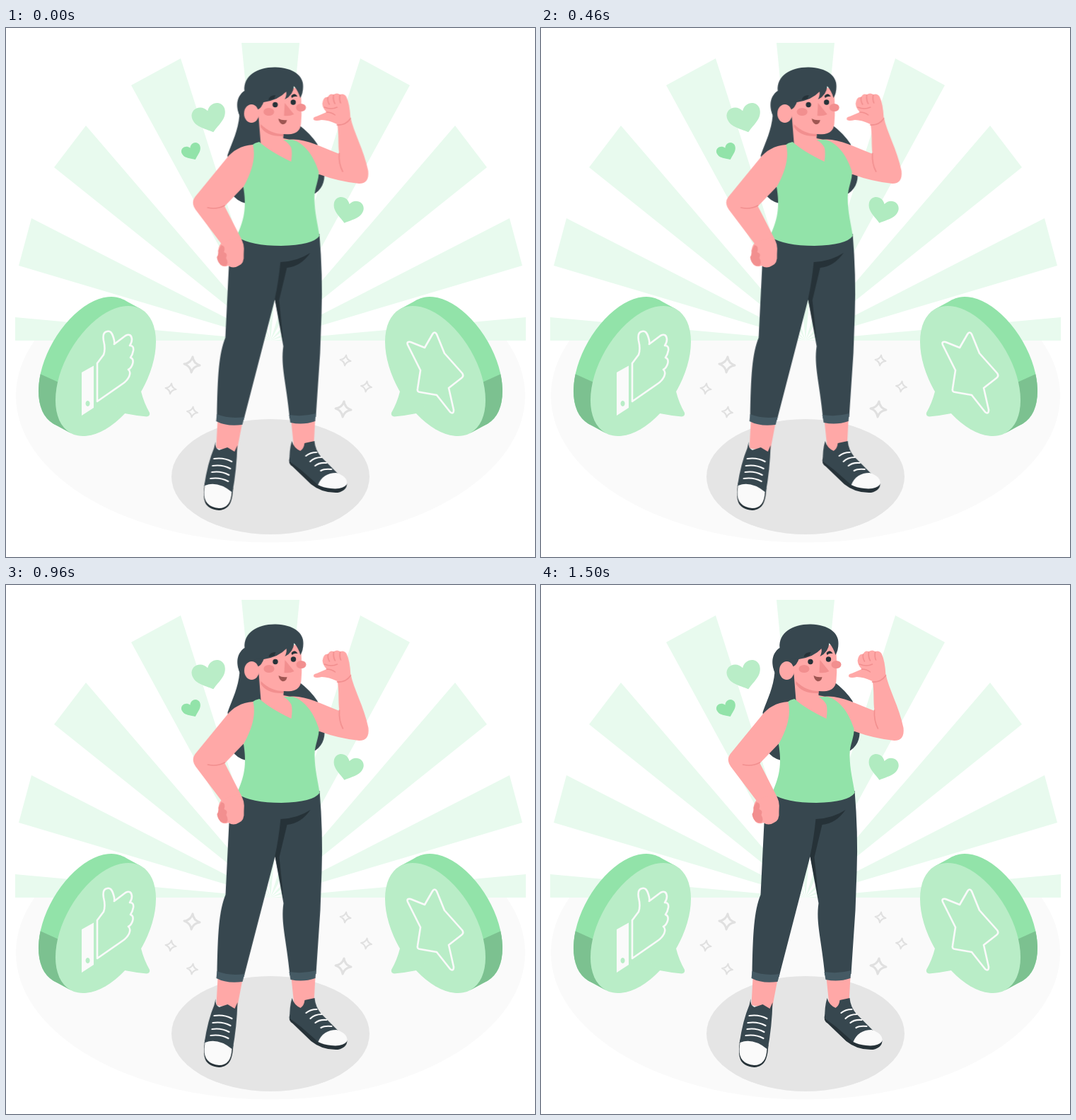
These frames come from a looping animation (748 px wide and 748 px high, 1540 ms). An HTML page without scripts:

```html
<!DOCTYPE html>
<html lang="en">
<head>
<meta charset="utf-8">
<title>Confident woman</title>
<style>
  html, body { margin: 0; width: 100%; height: 100%; overflow: hidden; background: #fff; }
  svg { display: block; width: 100vw; height: 100vh; }
  .woman { animation: shake 1540ms linear -42ms infinite; }
  @keyframes shake {
    0%, 100% { transform: translateX(0); }
    10%, 90% { transform: translateX(-1.5px); }
    20%, 80% { transform: translateX(3px); }
    30%, 50%, 70% { transform: translateX(-6px); }
    40%, 60% { transform: translateX(6px); }
  }
  .rays { fill: #e8faee; }
  .mint { fill: #92e3a9; }
  .pale { fill: #b9edc7; }
  .moss { fill: #7cc190; }
  .dark { fill: #37474f; }
  .deep { fill: #263238; }
  .hem { fill: #455a64; }
  .skin { fill: #ffa8a7; }
  .blush { fill: #f28f8f; }
  .white { fill: #fafafa; }
  .line { fill: none; stroke-linecap: round; stroke-linejoin: round; }
  .icon { stroke: #fafafa; stroke-width: 2.6; }
  .crease { stroke: #f28f8f; stroke-width: 1.6; }
  .lace { stroke: #fafafa; stroke-width: 2.2; }
  .sparkles { stroke: #e0e0e0; }
</style>
</head>
<body>
<svg viewBox="0 0 748 748">
  <defs>
    <path id="rays" d="M374 442 177 81 247 43ZM374 442 68 197 113 138ZM374 442 18 336 36 269ZM374 442H13V409Z"/>
    <path id="heart" d="M0 20C-11 11-24 6-24-8C-23-21-6-23 0-11C6-23 23-21 24-8C24 6 11 11 0 20Z"/>
    <path id="sparkle" d="M0-11Q2-2 11 0Q2 2 0 11Q-2 2-11 0Q-2-2 0-11Z"/>
    <clipPath id="floor"><path d="M0 442H748V748H0Z"/></clipPath>
    <clipPath id="underside"><path d="M30 481 90 508V600H30Z"/></clipPath>
    <ellipse id="disc" rx="100.8" ry="57.9" transform="rotate(-60.1)"/>
    <g id="rim">
      <use href="#disc" transform="translate(117 472)"/>
      <path d="M166.5 384.2 190.5 397.2 91.5 572.8 67.5 559.8Z"/>
    </g>
    <g id="bubble">
      <use href="#rim" class="mint"/>
      <use href="#rim" class="moss" clip-path="url(#underside)"/>
      <g class="pale">
        <use href="#disc" transform="translate(141 485)"/>
        <path d="M180 500 191 514Q195 530 203 544Q204 549 199 549.5Q183 548 168 545L150 530Z"/>
      </g>
    </g>
  </defs>

  <ellipse cx="374" cy="520" rx="360" ry="207.5" fill="#fafafa" clip-path="url(#floor)"/>
  <g class="rays">
    <path d="M374 442 333 21H415Z"/>
    <use href="#rays"/>
    <use href="#rays" transform="translate(748) scale(-1 1)"/>
  </g>
  <ellipse cx="374" cy="634.5" rx="140" ry="81.5" fill="#e5e5e5"/>

  <use href="#bubble"/>
  <path class="white" fill-rule="evenodd" d="M107 487 124 477.500V537L107 548ZM115.500 527a3 4 0 1 0 .1 0Z"/>
  <path class="line icon" d="M129 528V474L138 462Q141 454 138 442Q136 430 143 429Q149 427 152 438Q154 444 153 447L169 435Q177 431 178 440Q178 445 175 449Q181 449 180 456Q179 462 176 466Q181 468 179 475Q177 481 173 483Q177 486 174 493Q171 499 165 503Z"/>

  <use href="#bubble" transform="translate(748) scale(-1 1)"/>
  <path class="line icon" d="M603 433Q606 428 609 433L620 460 645 488Q648 492 644 495L626 509 633 540Q633 547 628 543L609 519 586 515Q581 515 582 510L586 484 568 448Q566 443 572 444L592 452Z"/>

  <use href="#heart" class="pale" transform="translate(288 128) rotate(-15)"/>
  <use href="#heart" class="mint" transform="translate(263 175.500) rotate(-24) scale(.58)"/>
  <use href="#heart" fill="#b0ebc0" transform="translate(483 258.500) rotate(15) scale(.89)"/>

  <g class="line sparkles" stroke-width="3">
    <use href="#sparkle" transform="translate(263 476) rotate(5)"/>
    <use href="#sparkle" transform="translate(477 539) rotate(5)"/>
    <use href="#sparkle" transform="translate(233 510) rotate(8) scale(.68)"/>
    <use href="#sparkle" transform="translate(263.500 543) rotate(8) scale(.68)"/>
    <use href="#sparkle" transform="translate(480 470) rotate(8) scale(.68)"/>
    <use href="#sparkle" transform="translate(509.500 507) rotate(8) scale(.68)"/>
  </g>

  <g class="woman"><g transform="translate(.5)">
    <!-- back hair -->
    <path class="dark" d="M340 89C326 93 324 110 330 123C328 146 320 160 313 180L319 234Q326 245 339 248L437 234C449 226 452 212 449 200L440 164Q430 149 414 137Z"/>

    <!-- raised arm -->
    <path class="skin" d="M471 178C469 164 471 150 468 135L487 126C491 147 506 172 512 202Q514 220 499 220Q470 217 443 207L420 205 400 158C420 155 445 168 471 178Z"/>
    <path class="skin" d="M435 130Q433 126 439 125L453 119Q445 110 448 103Q450 97 455 98Q457 92 463 94Q468 91 472 94Q478 92 481 97Q486 107 487 128Q480 141 468 136Q456 130 446 130Q438 132 435 130Z"/>
    <path class="line crease" d="M468 137Q480 138 487 128M455 98Q454 103 457 108M463 95Q462 102 465 107M472 95Q471 102 473 106M450 112Q460 116 468 112M453 119Q460 119 465 123M471 177Q470 192 476 203"/>

    <!-- ankles -->
    <path class="skin" d="M299 556 334 558 326 600 297 594ZM403 555 437 554 435 592 420 602 407 594Z"/>

    <!-- shoes -->
    <path class="deep" d="M281 643C277 668 280 680 301 682C317 681 320 668 321 650ZM401 607Q398 616 405 620L431 645Q447 658 469 657Q482 654 482 644Z"/>
    <path class="dark" d="M296 585Q295 594 301 597L313 593 323 599 327 590Q326 625 320 657L280 648Q285 615 294 594ZM404 584Q407 594 416 598Q421 595 422 587L436 584Q437 596 445 606L470 631 442 647 417 625 401 613Q400 598 404 584Z"/>
    <path class="white" d="M281 647Q299 640 319 656Q318 679 301 679Q279 677 280 656ZM441 646Q448 629 467 629Q483 634 482 645Q476 653 459 651Q448 650 441 646Z"/>
    <path class="line lace" d="M294 609Q308 607 319 613M292 619Q306 617 317 623M291 628Q304 626 315 632M289 637Q303 635 314 641M424 605Q430 600 439 600M430 613Q436 607 446 607M437 619Q443 614 453 615M445 626Q450 623 460 624"/>

    <!-- trousers -->
    <path class="dark" d="M328 293 443 291Q448 350 446 405L444 460 438 550 401 552C396 500 388 478 392 450L380 384 336 554 298 552C299 490 301 460 310 438L315 337Z"/>
    <path class="deep" d="M388 331Q412 330 430 318Q417 337 397 339L386 385 392 444 380 383Q385 360 388 331Z"/>
    <path class="hem" d="M298 546Q315 553 337 550L334 561Q312 564 297 556ZM400 547Q420 550 438 545L437 556Q420 562 402 558Z"/>

    <!-- neck and chest -->
    <path class="skin" d="M357 125 360 163 347 166 360 200H410L408 159 392 156V140Z"/>

    <!-- top -->
    <path class="mint" d="M347 166Q352 162 358 161Q372 174 403 189Q405 176 403 169Q399 162 392 158H405C420 162 434 178 442 203C443 214 436 226 436 240C436 262 441 278 443 294Q434 307 389 308Q346 308 326 295C336 272 341 255 335 222Q352 195 347 166Z"/>

    <!-- arm on hip -->
    <path class="skin" d="M349 165C332 166 320 174 312 184L267 239Q261 247 268 257L305 306 333 299 309 252 336 224Q355 190 349 165Z"/>
    <path class="skin" d="M305 303Q299 310 300 318Q297 328 303 335Q308 339 314 336Q321 341 329 336Q337 333 336 320Q338 304 330 295Z"/>
    <path class="blush" d="M304 307Q311 308 308 317Q314 319 311 325Q315 333 311 336Q300 337 298 324Q301 320 300 315Z"/>
    <path class="line crease" d="M285 254Q298 257 309 251"/>

    <!-- head -->
    <path class="skin" d="M355 90 416 84Q419 115 417 135Q416 148 403 150Q376 152 360 137L355 118Z"/>
    <path class="blush" d="M360 136Q374 150 392 150V153Q369 154 360 140Z"/>
    <path class="dark" d="M330 124C325 107 329 93 337 89C335 67 356 55 381 55.500C406 56 421 68 420 83Q420 92 416 99Q413 89 407 82Q406 95 394 101Q397 95 396 90Q385 102 364 105Q361 112 357 113L354 133 340 131Z"/>
    <ellipse class="skin" cx="347" cy="121" rx="10.500" ry="13"/>
    <path class="dark" d="M348 106Q360 103 364 104Q361 114 356 115Q354 109 348 106Z"/>
    <ellipse class="blush" cx="371.500" cy="118.500" rx="7.500" ry="5.500"/>
    <ellipse class="blush" cx="417" cy="112.500" rx="7" ry="5.500"/>
    <path class="blush" d="M394 106 407 122Q401 125 393 124Z"/>
    <circle class="deep" cx="380.500" cy="108.500" r="3.700"/>
    <circle class="deep" cx="406" cy="105" r="3.700"/>
    <path class="deep" d="M371 102Q372 95 381 95L379 100ZM403 96Q408 90 412 97Q407 96 404 99Z"/>
    <path fill="#9e5652" d="M385 128Q390 131 397 130Q396 137 390 136Q386 134 385 128Z"/>
  </g></g>
</svg>
</body>
</html>
```
